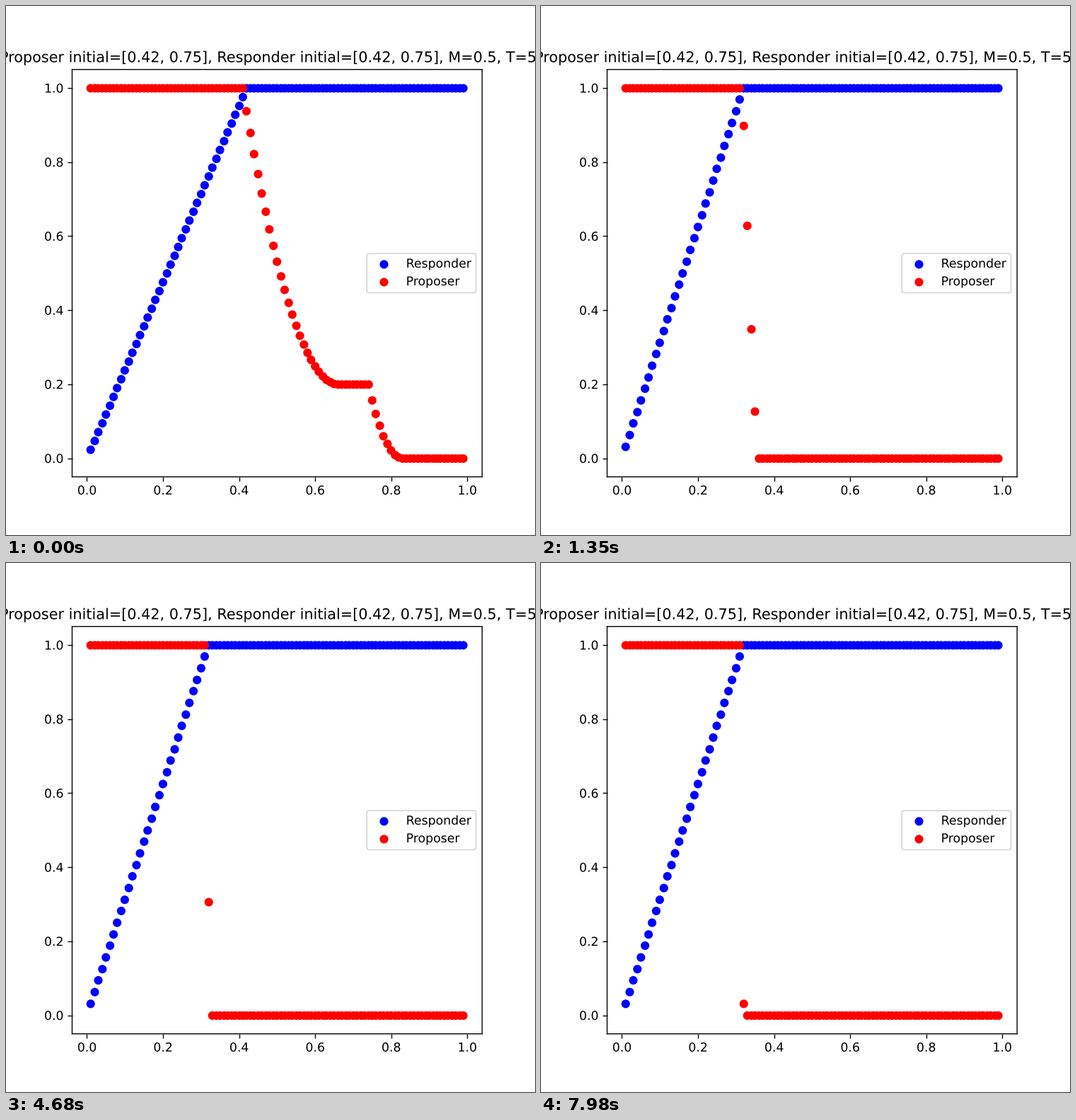
Write a matplotlib script that moves like this. It is 748x748 px and loops after 8000 ms.

```python
import numpy as np
import matplotlib.pyplot as plt
from matplotlib.animation import FuncAnimation
from matplotlib.lines import Line2D
from matplotlib.patheffects import Normal
from matplotlib.text import Text

SIZE = 748
RASTER = 900               # the dots sit on whole pixels of this finer raster
STEP_MS = 30
INTERVAL = 20
FRAMES = 400
RATE = 0.5                 # learning rate
START, MIX = (0.42, 0.75), 0.5

grid = np.arange(1, 100) / 100


def to_simplex(v):
    """Euclidean projection onto the probability simplex."""
    s = np.sort(v)[::-1]
    levels = (np.cumsum(s) - 1) / np.arange(1, len(v) + 1)
    n = np.nonzero(s > levels)[0][-1]
    return np.maximum(v - levels[n], 0)


def start_mix():
    p = np.zeros(len(grid))
    for x, w in zip(START, (MIX, 1 - MIX)):
        p[round(x * 100) - 1] = w
    return p


def play(steps):
    """Ultimatum game: both sides follow the regularised leader."""
    offers, limits = start_mix(), start_mix()
    offer_score = np.zeros(len(grid))
    limit_score = np.zeros(len(grid))
    history = []
    for _ in range(steps):
        offer_score += (1 - grid) * np.cumsum(limits)
        limit_score += np.cumsum((grid * offers)[::-1])[::-1]
        offers = to_simplex(RATE * offer_score)
        limits = to_simplex(RATE * limit_score)
        history.append((np.cumsum(limits), 1 - np.cumsum(offers)))
    return history


def step_at(i):
    return (i * INTERVAL + INTERVAL // 2) // STEP_MS


def on_raster(y):
    """Data points moved to the nearest raster pixel, halves right and down."""
    scale = RASTER / SIZE
    px = ax.transData.transform(np.column_stack([grid, y])) * scale
    px[:, 0] = np.floor(px[:, 0] + 0.5 + 1e-6)
    px[:, 1] = np.ceil(px[:, 1] - 0.5 - 1e-6)
    return ax.transData.inverted().transform(px / scale)


def scatter(color, label):
    # one colour per dot keeps the renderer from snapping the dots
    return ax.scatter(grid, grid, c=[color] * len(grid), label=label)


history = play(step_at(FRAMES - 1) + 1)

plt.rcParams["path.snap"] = False
plt.rcParams["text.hinting"] = "none"
fig, ax = plt.subplots(figsize=(6, 6), dpi=SIZE / 6)
ax.set_xlim(-0.039, 1.039)
ax.set_ylim(-0.05, 1.05)
blue = scatter("blue", "Responder")
red = scatter("red", "Proposer")
ax.legend(loc="center right")
ax.set_title(f"Proposer initial={list(START)}, Responder initial={list(START)}, "
             f"M={MIX}, T=500")

# text and ticks as plain outlines, placed between whole pixels
fig.canvas.draw()
for kind in (Text, Line2D):
    for artist in fig.findobj(kind):
        artist.set_path_effects([Normal()])


def update(i):
    for dots, y in zip((blue, red), history[step_at(i)]):
        dots.set_offsets(on_raster(y))
    return blue, red


anim = FuncAnimation(fig, update, frames=FRAMES, interval=INTERVAL,
                     repeat=True, repeat_delay=0)
plt.show()
```
